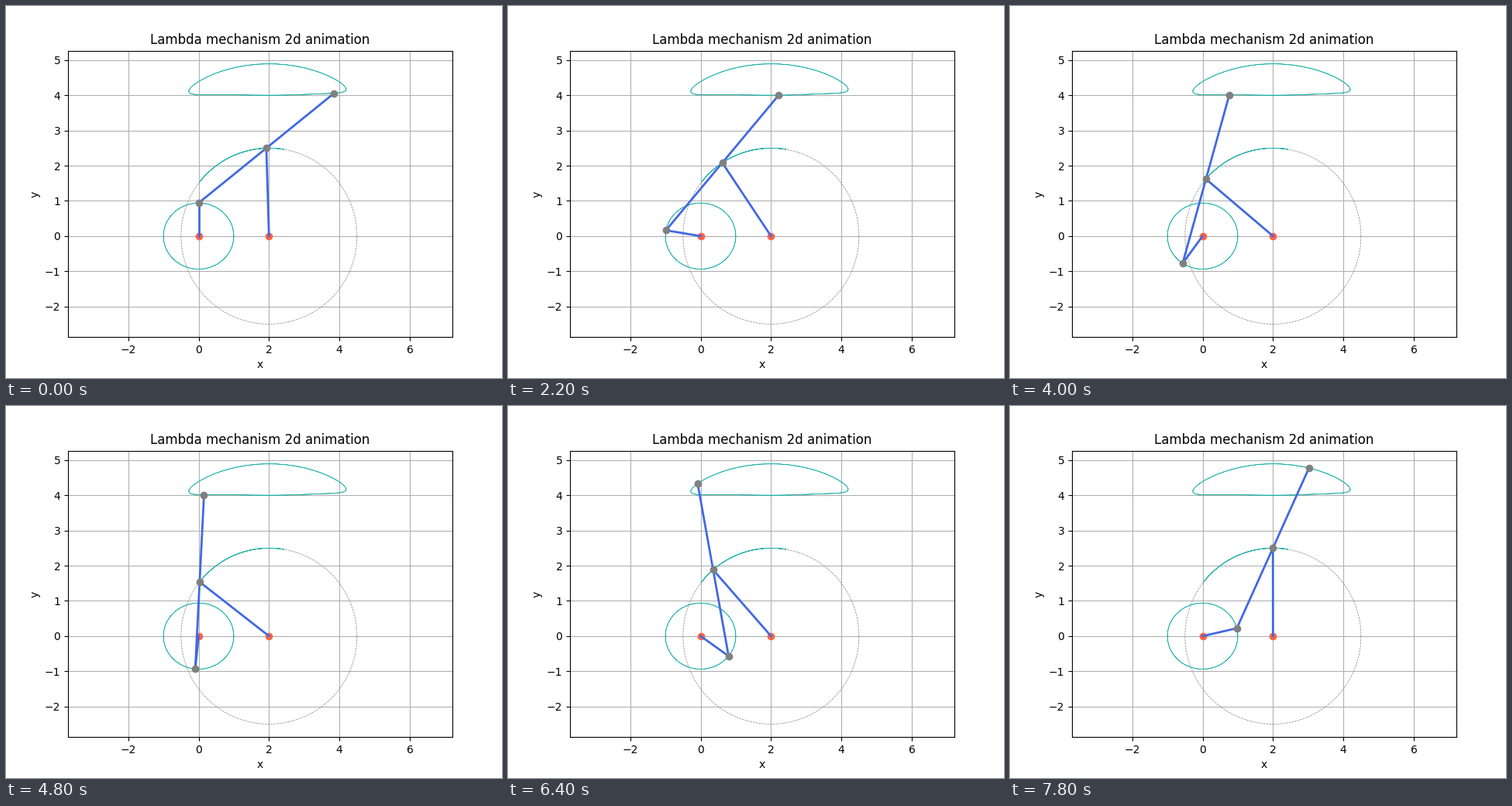
These frames come from a looping animation (640x480 px, 8 s). A matplotlib script:

```python
import numpy as np
import matplotlib.pyplot as plt
from matplotlib.animation import FuncAnimation

CRANK, GROUND, LINK = 1.0, 2.0, 2.5
TILT = np.radians(20)  # the crank turns in a plane tilted about the x axis
STEPS = 100
FRAMES = 40

theta = np.pi / 2 + np.linspace(0, 4 * np.pi, STEPS)


def solve(angle):
    """Return crank pin, middle joint and coupler end for a crank angle."""
    ax_, ay = CRANK * np.cos(angle), CRANK * np.sin(angle) * np.cos(TILT)
    az = CRANK * np.sin(angle) * np.sin(TILT)
    dx, dy = ax_ - GROUND, ay
    dist = np.hypot(dx, dy)
    ux, uy = dx / dist, dy / dist
    along = (dist**2 + az**2) / (2 * dist)
    height = np.sqrt(LINK**2 - along**2)
    bx = GROUND + along * ux + height * uy
    by = along * uy - height * ux
    pin, mid = np.array([ax_, ay]), np.array([bx, by])
    return pin, mid, 2 * mid - pin


pin, mid, end = solve(theta)

fig, ax = plt.subplots(figsize=(6.4, 4.8), dpi=100)
ax.set_title("Lambda mechanism 2d animation")
ax.set_xlabel("x")
ax.set_ylabel("y")
ax.grid(True)

turn = np.linspace(0, 2 * np.pi, 200)
ax.plot(GROUND + LINK * np.cos(turn), LINK * np.sin(turn),
        "--", color="gray", lw=0.5)
for path in (pin, mid, end):
    ax.plot(*path, color="lightseagreen", lw=0.5)

ax.plot([0, GROUND], [0, 0], "o", color="tomato")
crank, rocker, coupler = (
    ax.plot([], [], color="royalblue", lw=2)[0] for _ in range(3))
joints, = ax.plot([], [], "o", color="gray")
ax.axis("equal")


def update(i):
    a, b, c = pin[:, i], mid[:, i], end[:, i]
    crank.set_data([0, a[0]], [0, a[1]])
    rocker.set_data([GROUND, b[0]], [0, b[1]])
    coupler.set_data([a[0], c[0]], [a[1], c[1]])
    joints.set_data(*np.column_stack([a, b, c]))
    return crank, rocker, coupler, joints


anim = FuncAnimation(fig, update, frames=FRAMES, interval=200,
                     repeat=True, repeat_delay=0)
plt.show()
```
